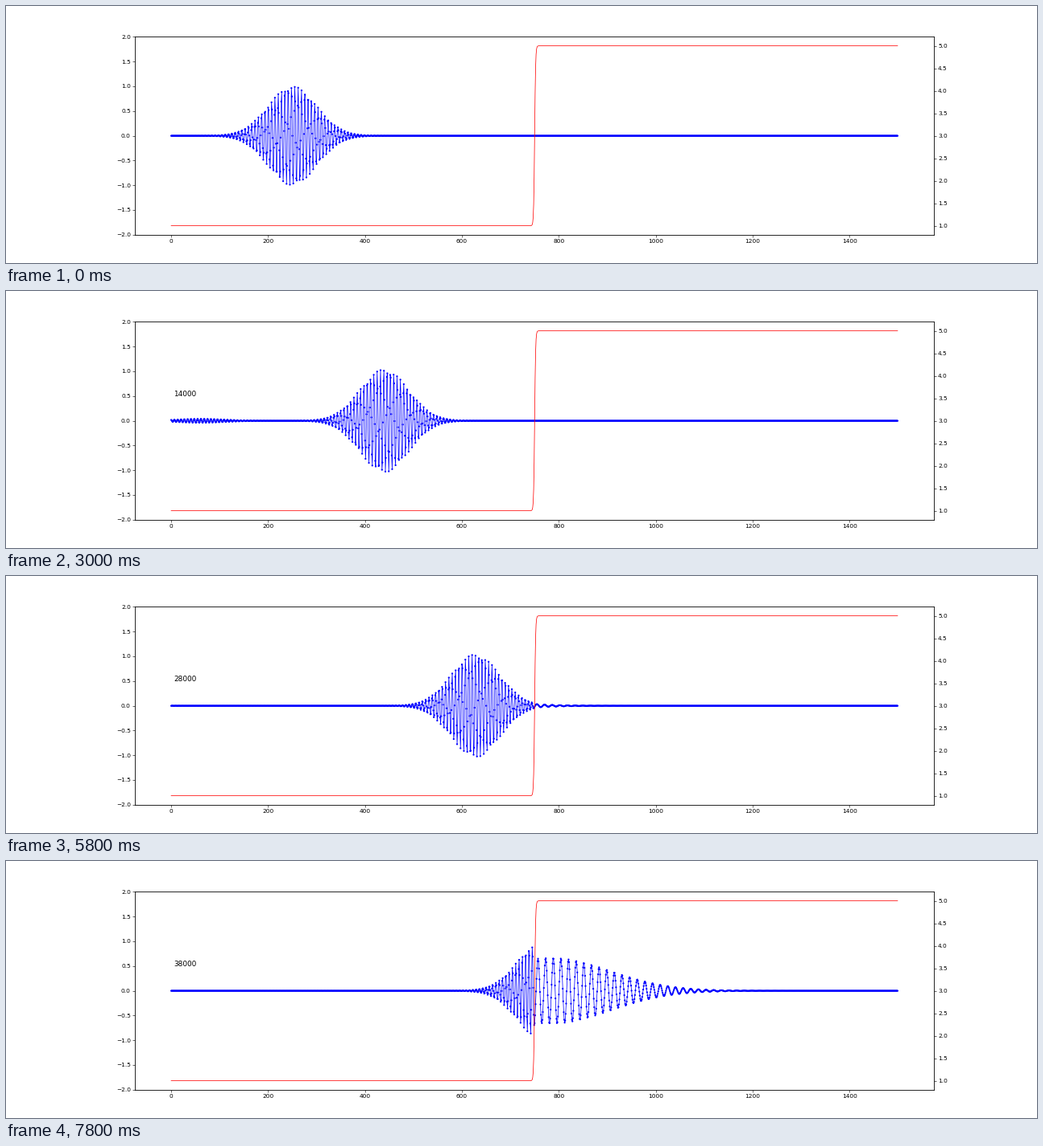
These frames come from a looping animation (1280 px wide and 320 px high, 8 s). A matplotlib script:

```python
import numpy as np
import matplotlib.pyplot as plt
from matplotlib.animation import FuncAnimation

FRAMES = 40
STEPS = 1000        # integration steps per frame
LEAD = 100          # steps done before the counter starts
DT = 0.015
N = 1500
Q = 0.918           # wave number of the packet
CENTER, SIGMA = 250, 50
BOOST = 1.08        # launch speed relative to a pure right-going wave

x = np.arange(N)
stiffness = 3 + 2 * np.tanh((x - N / 2) / 2)


def launch():
    d = x - CENTER
    envelope = np.exp(-d**2 / (2 * SIGMA**2))
    omega, group = 2 * np.sin(Q / 2), np.cos(Q / 2)
    drift = omega * np.cos(Q * d) - group * d / SIGMA**2 * np.sin(Q * d)
    return -envelope * np.sin(Q * d), BOOST * envelope * drift


def simulate():
    """Chain of unit masses joined by springs, absorbing at the left end."""
    u, v = launch()
    springs = stiffness[1:]
    force = np.zeros(N)
    states = [u.copy()]
    for n in range(LEAD + (FRAMES - 2) * STEPS + 1):
        if n % STEPS == LEAD:
            states.append(u.copy())
        pull = springs * (u[1:] - u[:-1])
        force[1:-1] = pull[1:] - pull[:-1]
        force[0] = pull[0] - (1 - np.cos(Q)) * u[0] - np.cos(Q / 2) * v[0]
        v += DT * force
        u += DT * v
    return states


states = simulate()

fig, ax = plt.subplots(figsize=(24, 6), dpi=160 / 3)
wave, = ax.plot(x, states[0], color="blue", lw=1)
# One size per dot keeps the dots off the pixel grid.
dots = ax.scatter(x, states[0], s=np.full(N, 9), color="blue", linewidths=0)
dots.set_snap(False)
ax.set_ylim(-2, 2)
label = ax.text(5, 0.5, "", fontsize=12)

ax2 = ax.twinx()
ax2.plot(x, stiffness, color="red", lw=1)


def update(i):
    wave.set_ydata(states[i])
    dots.set_offsets(np.column_stack([x, states[i]]))
    label.set_text(str((i - 1) * STEPS) if i else "")
    return wave, dots, label


anim = FuncAnimation(fig, update, frames=FRAMES, interval=200,
                     repeat=True, repeat_delay=0)
plt.show()
```
